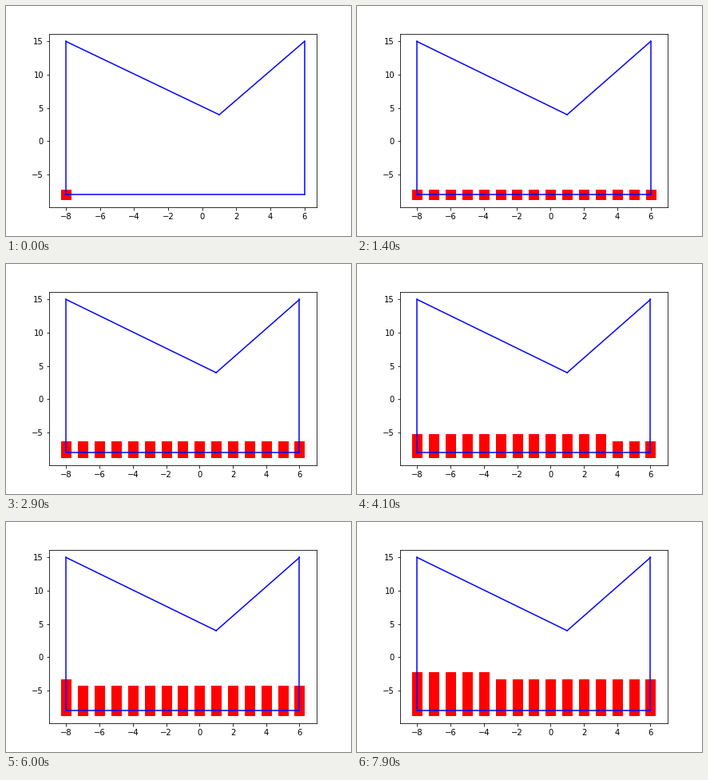
A matplotlib script that plays this animation: 432 px wide and 288 px high, repeating every 8 s.

```python
import numpy as np
import matplotlib.pyplot as plt
from matplotlib.animation import FuncAnimation

FRAMES = 80
COLS = 15
SIZE = 150  # marker area in square points
CORNERS = np.array([(-8, -8), (6, -8), (6, 15), (1, 4), (-8, 15)], float)

steps = np.arange(FRAMES)
cells = np.column_stack((steps % COLS, steps // COLS)) - 8.0

fig = plt.figure(figsize=(6, 4), dpi=72)
ax = fig.add_subplot()
fig.subplots_adjust(left=0.125, right=0.9, bottom=0.125, top=0.88)

for a, b in zip(CORNERS, np.roll(CORNERS, -1, axis=0)):
    ax.plot([a[0], b[0]], [a[1], b[1]], color="blue")
dots = ax.scatter([], [], s=SIZE, c="red", marker="s")


def padded(lo, hi):
    margin = 0.05 * (hi - lo)
    return lo - margin, hi + margin


def grow_views():
    """View limits per step: each new square widens them by its own extent."""
    pixels = ax.get_window_extent().size
    half = np.sqrt(SIZE) / 2
    lo, hi = CORNERS.min(axis=0), CORNERS.max(axis=0)
    views = []
    for cell in cells:
        low, high = padded(lo, hi)
        reach = half * (high - low) / pixels
        lo = np.minimum(lo, cell - reach)
        hi = np.maximum(hi, cell + reach)
        views.append(padded(lo, hi))
    return views


views = grow_views()


def update(i):
    dots.set_offsets(cells[:i + 1])
    low, high = views[i]
    ax.set_xlim(low[0], high[0])
    ax.set_ylim(low[1], high[1])
    return (dots,)


anim = FuncAnimation(fig, update, frames=FRAMES, interval=100,
                     repeat=True, repeat_delay=0, blit=False)
plt.show()
```
